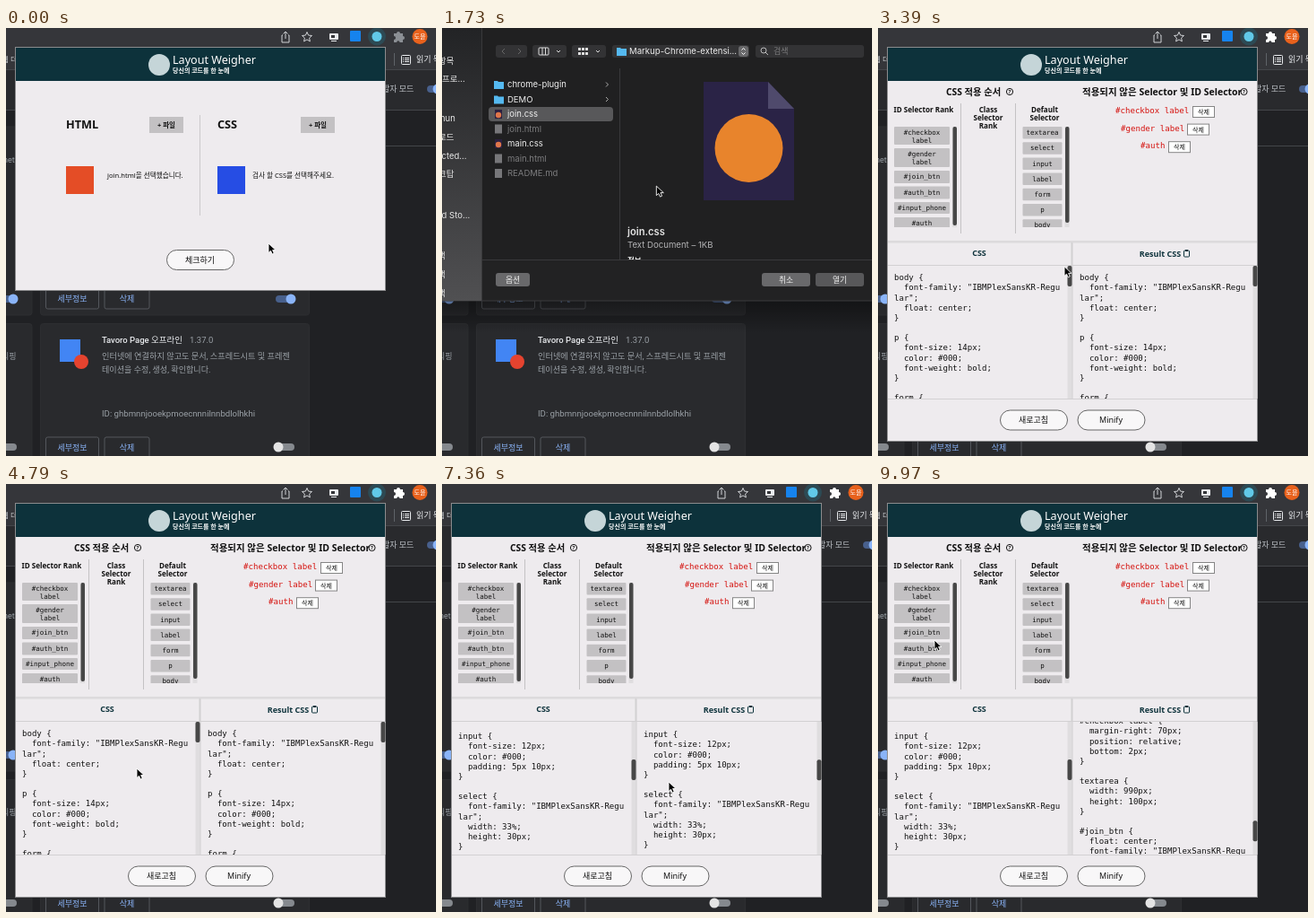
Animation of 480x477 px, one loop 10 s. Source, as an HTML page:

```html
<!DOCTYPE html>
<html lang="ko">
<head>
<meta charset="utf-8">
<style>
  html, body { margin: 0; height: 100%; overflow: hidden; background: #202124; }
  svg { display: block; width: 100vw; height: 100vh; }
  text { font-family: "Noto Sans", "Noto Sans CJK KR", "Noto Sans CJK", sans-serif; white-space: pre; }
  .ui text { font-family: Inter, "Noto Sans CJK KR", "Noto Sans CJK", sans-serif; }
  .page text { font-family: Roboto, "Noto Sans CJK KR", "Noto Sans CJK", sans-serif; }
  .mono text { font-family: "DejaVu Sans Mono", monospace; }
</style>
</head>
<body>
<svg id="stage" viewBox="0 0 480 477"></svg>
<script>
const INK = '#111', TEAL = '#0d323b', PAPER = '#eeebee', GREY = '#9aa0a6', BLUE = '#8ab4f8', CHIP = '#c3c1c3';

// Markup helpers; text is placed by its vertical centre
const rect = (x, y, w, h, fill, rx = 0, stroke = 'none') =>
  `<rect x="${x}" y="${y}" width="${w}" height="${h}" rx="${rx}" fill="${fill}" stroke="${stroke}"/>`;
const dot = (x, y, r, fill, stroke = 'none') => `<circle cx="${x}" cy="${y}" r="${r}" fill="${fill}" stroke="${stroke}"/>`;
const path = (d, stroke, fill = 'none', w = 1) => `<path d="${d}" stroke="${stroke}" fill="${fill}" stroke-width="${w}"/>`;
const text = (x, y, size, str, fill = INK, weight = 400, anchor = 'start') =>
  `<text x="${x}" y="${y + size * .36}" font-size="${size}" fill="${fill}" font-weight="${weight}" text-anchor="${anchor}">${str}</text>`;
const mid = (x, y, size, str, fill, weight) => text(x, y, size, str, fill, weight, 'middle');
const group = (id, body, cls = '') => `<g id="${id}" class="${cls}">${body}</g>`;
const fade = (id, from, to, fromAlpha = 1, toAlpha = 1) => `<linearGradient id="${id}" x2="0" y2="1">
  <stop stop-color="${from}" stop-opacity="${fromAlpha}"/><stop offset="1" stop-color="${to}" stop-opacity="${toAlpha}"/></linearGradient>`;
const clip = (id, ...box) => `<clipPath id="${id}">${rect(...box, '#000')}</clipPath>`;
const pill = (x, y, label) => rect(x, y, 75, 22, '#f8f7f8', 11, '#666') + mid(x + 37, y + 11, 9, label);

function browser() {
  const outline = (x, y, w, label) => rect(x, y, w, 23, 'none', 2, '#54575c') + mid(x + w / 2, y + 11.5, 9, label, BLUE, 500);
  const buttons = y => outline(44.5, y, 59, '세부정보') + outline(110, y, 50, '삭제');
  const card = (x, y, w, h) => rect(x, y, w, h, '#292a2d', 3, '#2d2e31');
  const toggle = (x, y, on) => rect(x, y - 4, 21, 8, on ? '#48608c' : '#85898e', 4)
    + dot(on ? x + 17 : x + 3, y, 5.5, on ? BLUE : '#e4e4e4');
  return rect(0, 0, 480, 477, '#202124') + rect(0, 0, 480, 46, '#35363a') + rect(0, 47, 480, 44, '#292a2d')
    + path('M0 46.5H480M0 91.5H480M0 131.5H480', '#44464a')
    + path('M309 8h-1v8h8v-8h-1M312 12V4M309.5 6.5L312 4l2.5 2.5', '#d0d2d5')
    + path('M336 4.5l1.6 3.6 3.9.4-2.9 2.6.8 3.8-3.4-2-3.4 2 .8-3.8-2.9-2.6 3.9-.4z', '#d0d2d5')
    + rect(361, 6, 10, 7, '#e8eaed', 1) + rect(363, 8, 4, 3, '#35363a') + rect(363, 14, 6, 1, '#e8eaed')
    + rect(384, 3, 12, 12, '#1683ee', 1) + dot(414, 9.5, 10, '#2d4a54') + dot(414, 9.5, 5.5, '#61c9e8')
    + '<path id="puzzle" d="M433 6h3a2 2 0 1 1 4 0h3v3a2 2 0 1 1 0 4v3h-3.5a1.7 1.7 0 0 0-3.4 0H433v-3a2 2 0 0 0 0-4z"/>'
    + dot(462, 9.5, 8.5, '#e8611c') + mid(462, 9.5, 7, '도윤', '#fff')
    + text(-5, 35, 8.5, '웹 더', '#c4c7cb') + path('M433.5 28V42', '#5f6368')
    + rect(441.5, 30.5, 10, 10, 'none', 1, '#e8eaed') + path('M443 33.5h1m1 0h5M443 35.5h1m1 0h5M443 37.5h1m1 0h5', '#e8eaed')
    + text(458, 35, 9, '읽기 목록', '#e8eaed')
    + text(420, 68, 9, '발자 모드', '#bdc1c6') + rect(470, 64, 20, 8, '#48608c', 4) + dot(482, 68, 5.5, BLUE)
    + card(-20, 110, 49, 210) + card(38.5, 110, 300, 210) + card(-20, 329.5, 49, 160) + card(38.5, 329.5, 300, 160)
    + text(-3, 147, 9, 'net', GREY) + text(-5, 366, 9, '리핑', GREY)
    + toggle(-9, 302, true) + toggle(301, 302, true) + buttons(290)
    + rect(-8, 463, 20, 8, '#85898e', 4) + toggle(301, 467, false) + buttons(456)
    + rect(60, 347, 23, 25, '#4285f4') + dot(84, 372, 8, '#e5432f')
    + text(107, 348, 9.5, 'Tavoro Page 오프라인', '#e8eaed', 500) + text(205, 348, 9.5, '1.37.0', GREY)
    + text(107, 366, 9.2, '인터넷에 연결하지 않고도 문서, 스프레드시트 및 프레젠', GREY)
    + text(107, 381, 9.1, '테이션을 수정, 생성, 확인합니다.', GREY)
    + text(107, 430, 9.6, 'ID: ghbmnnjooekpmoecnnnilnnbdlolhkhi', GREY);
}

const popupFrame = h => rect(10.5, 21.5, 413, h, PAPER, 0, '#8b8b8d') + rect(11, 22, 412, 37, TEAL)
  + dot(171, 41, 12, '#c5d5d8') + text(186, 35.5, 12.6, 'Layout Weigher', '#fff')
  + text(186, 47, 7, '당신의 코드를 한 눈에', '#fff', 600);

function picker() {
  const column = (x, name, colour) => text(x, 107, 12.7, name, INK, 600)
    + rect(x + 93, 99, 38, 18, CHIP) + mid(x + 112, 108, 7.5, '+ 파일', INK, 600) + rect(x, 154, 31, 31, colour);
  return popupFrame(271) + column(67, 'HTML', '#e44d26') + column(236, 'CSS', '#264de4')
    + path('M216.5 97V209', '#cbc9cb')
    + text(113, 164, 7.6, 'join.html을 선택했습니다.', INK, 500)
    + group('waiting', text(275, 164, 7.6, '검사 할 CSS를 선택해주세요.', INK, 500))
    + group('chosen', text(275, 164, 7.6, 'join.css을 선택했습니다.', INK, 500))
    + pill(179.5, 247.5, '체크하기');
}

const FAMILY = 'font-family: "IBMPlexSansKR-Regu\nlar"';
const RULES = [
  ['body', FAMILY, 'float: center'],
  ['p', 'font-size: 14px', 'color: #000', 'font-weight: bold'],
  ['form', FAMILY, 'width: 990px', 'margin: 0 auto', 'padding: 10px', 'font-size: 12px', 'color: #000'],
  ['label', 'font-size: 12px', 'color: #000'],
  ['input', 'font-size: 12px', 'color: #000', 'padding: 5px 10px'],
  ['select', FAMILY, 'width: 33%', 'height: 30px'],
  ['#input_phone', 'width: 70%', 'height: 30px', 'float: left'],
  ['#auth_btn', 'width: 25%', 'height: 30px', 'color: #fff', 'border: none', 'float: right'],
  ['#gender label', 'margin-right: 70px', 'position: relative', 'bottom: 2px'],
  ['#auth', 'width: 100%', 'height: 30px', 'float: left', 'margin: 5px 0', 'padding: 5px', 'color: #000'],
  ['#checkbox label', 'margin-right: 70px', 'position: relative', 'bottom: 2px'],
  ['textarea', 'width: 990px', 'height: 100px'],
  ['#join_btn', 'float: center', FAMILY, 'width: 200px', 'height: 40px', 'color: #fff', 'border: none', 'margin: 10px', 'font-size: 14px', 'cursor: pointer']
];
const lines = RULES.map(([name, ...props]) => `${name} {\n${props.map(p => `  ${p};\n`).join('')}}\n`).join('\n').split('\n');

function results() {
  const chip = (x, y, w, h, words) => rect(x, y, w, h, CHIP, 1)
    + words.split(' ').map((s, i, all) => mid(x + w / 2, y + 6.5 + i * 9 - (all.length > 1 ? .5 : 0), 7.5, s)).join('');
  const ids = [[110, 20, '#checkbox label'], [134, 21, '#gender label'], [159, 14, '#join_btn'],
    [176.5, 14, '#auth_btn'], [194, 13, '#input_phone'], [211, 14, '#auth']];
  const tags = ['textarea', 'select', 'input', 'label', 'form', 'p', 'body'];
  const unused = [['#checkbox label', 265, 351], ['#gender label', 271, 345], ['#auth', 293, 324]];
  const head = (x, words) => words.split('|').map((s, i) => mid(x, 91 + i * 9, 8.1, s, INK, 600)).join('');
  const help = (x, y) => dot(x, y, 3.6, 'none', INK) + mid(x, y, 6, '?', INK, 700);
  const code = (id, x) => '<g clip-path="url(#codeClip)">' + group(id, lines.map((s, i) => text(x, 278 + i * 11.17, 9.05, s)).join(''), 'mono') + '</g>';
  const bar = (id, x) => rect(x, 265, 5, 148, '#dfdddf') + group(id, rect(x, 265, 5, 23, '#474747', 2));
  return popupFrame(439)
    + text(76, 71, 10.3, 'CSS 적용 순서', INK, 600) + help(147, 71)
    + text(228, 71, 10.5, '적용되지 않은 Selector 및 ID Selector', INK, 600) + help(408.5, 71)
    + head(51, 'ID Selector Rank') + head(123, 'Class|Selector|Rank') + head(186, 'Default|Selector')
    + path('M92.5 84V229M153.5 84V229', '#c4c2c4')
    + '<g class="mono" clip-path="url(#listClip)">' + ids.map(([y, h, s]) => chip(18, y, 62, h, s)).join('')
    + tags.map((s, i) => chip(161.5, 110 + i * 17.2, 44, 13.5, s)).join('') + '</g>'
    + rect(83, 110, 5, 112, '#dfdddf') + rect(83.5, 110, 4.5, 110, '#474747', 2)
    + rect(208.5, 110, 5, 112, '#dfdddf') + rect(209, 110, 4.5, 107, '#474747', 2)
    + unused.map(([s, x, bx], i) => group('', text(x, 92 + i * 19.6, 9.1, s, '#d5120e'), 'mono')
      + rect(bx + .5, 87.5 + i * 19.6, 24, 12, '#fff', 0, '#858585') + mid(bx + 12.5, 93.5 + i * 19.6, 7, '삭제')).join('')
    + rect(11, 237, 412, 2.5, '#dcdadc') + path('M11 264.5H423M11 413.5H423', '#d2d0d2') + path('M216.5 239V413', '#d2d0d2', 'none', 2)
    + mid(113, 251, 9, 'CSS', TEAL, 600) + mid(315, 252, 9, 'Result CSS', TEAL, 600)
    + rect(341.5, 248, 6, 7, 'none', 1, TEAL) + rect(343, 247, 3, 2, TEAL)
    + code('leftCode', 18) + code('rightCode', 225) + bar('leftThumb', 211.5) + bar('rightThumb', 418.5)
    + pill(136.5, 426, '새로고침') + pill(223, 426, 'Minify');
}

function dialog() {
  const button = (x, w, label, fill = '#69696b', ink = '#eee') => rect(x, 273, w, 15, fill, 3) + mid(x + w / 2, 280.5, 8.8, label, ink);
  const folder = (x, y) => path(`M${x} ${y - 4}h4l1 1h6v8h-11z`, 'none', '#55b9f0');
  const tool = (x, w) => rect(x, 19, w, 14, '#333335', 3);
  const row = (s, i) => {
    const y = 63 + i * 16.5, dim = /html|md/.test(s);
    const icon = i < 2 ? folder(58, y) + path(`M183 ${y - 2.5}l2.5 2.5-2.5 2.5`, '#aaa')
      : rect(59, y - 5, 8, 10, dim ? '#77777a' : '#2b2040') + (dim ? '' : dot(63, y + 1, 3.2, '#e0764a'));
    return icon + text(73, y, 9.5, s, dim ? '#7c7c7e' : '#f0f0f0');
  };
  const side = [['항목', 37, -4], ['프로...', 57, 0], ['hun', 101, -2], ['로드', 122, -4], ['ected...', 143, -6],
    ['크탑', 163, -4], ['ud Sto...', 209, -6], ['색', 254, -5], ['색', 275, -5], ['색', 296, -5]];
  return rect(0, 304, 480, 36, 'url(#shadow)') + rect(-2, -30, 484, 334, '#202021', 0, '#3c3c3e')
    + rect(0, -30, 44, 334, 'url(#sidebar)')
    + side.map(([s, y, x]) => text(x, y, 9.5, s, '#e6e6e6')).join('')
    + path('M198.5 45V258', '#39393b')
    + tool(60, 35) + path('M70 23l-3 3 3 3M85 23l3 3-3 3', '#666')
    + tool(101, 38) + rect(108, 22, 11, 8, 'none', 1, '#ddd') + path('M112 22v8M115.5 22v8M128 25l2 2 2-2', '#ddd')
    + tool(145, 38) + [0, 4, 8].map(d => rect(152 + d, 22, 3, 3, '#ddd') + rect(152 + d, 27, 3, 3, '#ddd')).join('') + path('M172 25l2 2 2-2', '#ddd')
    + tool(190, 153) + folder(195, 26) + text(209, 26, 9.6, 'Markup-Chrome-extensi...', '#eee')
    + rect(331, 20, 11, 12, '#69696b', 3) + path('M334.5 24.5l2-2 2 2M334.5 27.5l2 2 2-2', '#fff')
    + tool(350, 121) + dot(359, 25, 3, 'none', '#bbb') + path('M361 27l3 3', '#bbb') + text(370, 26, 9, '검색', '#7c7c7e')
    + group('picked', rect(52, 88, 139, 16, '#58585a', 4)
      + path('M292 60H364L393 90V192H292z', 'none', '#2a2346') + path('M364 60L393 90H364z', 'none', '#4f4a6c')
      + dot(342.5, 134, 38, '#e8842c')
      + text(207, 227, 11.2, 'join.css', '#e4e4e4', 600) + text(207, 242, 9.6, 'Text Document – 1KB', '#b4b4b6')
      + text(207, 259, 8.5, '정보', '#eee', 700))
    + rect(44, 258, 436, 45, '#222223') + path('M44.5 -30V304M44 258.5H480', '#39393b')
    + ['chrome-plugin', 'DEMO', 'join.css', 'join.html', 'main.css', 'main.html', 'README.md'].map(row).join('')
    + button(60, 38, '옵션') + button(357, 54, '취소')
    + group('openOff', button(417, 54, '열기', '#2d2d2f', '#626264')) + group('openOn', button(417, 54, '열기', '#58585a'));
}

document.getElementById('stage').innerHTML =
  clip('codeClip', 11, 265, 412, 148) + clip('listClip', 11, 110, 206, 112)
  + fade('sidebar', '#1e1f21', '#505052') + fade('shadow', '#000', '#000', .4, 0)
  + group('browser', browser(), 'page') + group('picker', picker()) + group('results', results()) + group('dialog', dialog(), 'ui')
  + group('cursor', path('M0 0V10.5L2.5 8.3L4.2 12L6.2 11.1L4.6 7.5H8z', '#fff', '#000', .9));

const el = id => document.getElementById(id);
const show = (id, on) => el(id).setAttribute('display', on ? 'inline' : 'none');
const move = (id, x, y) => el(id).setAttribute('transform', `translate(${x} ${y})`);

// Eased value at time t from keys [time, value, ...]
function at(t, keys, n = 1) {
  const i = keys.findIndex(k => k[0] > t);
  if (i < 1) return keys[i < 0 ? keys.length - 1 : 0][n];
  const a = keys[i - 1], b = keys[i], u = (t - a[0]) / (b[0] - a[0]);
  return a[n] + (b[n] - a[n]) * u * u * (3 - 2 * u);
}

const POINTER = [[0, 293, 240], [90, 293, 240], [460, 348, 106], [580, 348, 106], [880, 150, 226], [1250, 85, 97],
  [1480, 85, 97], [2030, 440, 279], [2220, 440, 279], [2450, 350, 214], [2850, 220, 256], [3200, 220, 256],
  [3950, 146, 317], [4800, 146, 317], [5500, 133, 332], [6250, 133, 332], [6700, 253, 332], [9200, 253, 332], [9900, 63, 174]];
const DIALOG = [[690, 0], [1010, 1], [2330, 1], [2620, 0]];
const LEFT = [[4850, 0], [5750, 241.6], [5900, 241.6], [6200, 298.6]];
const RIGHT = [[6750, 0], [7320, 300.6], [7420, 300.6], [8800, 784.7]];

function frame(now) {
  const t = now % 10000, opacity = at(t, DIALOG), checked = t >= 3250, picked = t >= 1400;
  show('picker', !checked);
  show('results', checked);
  show('waiting', t < 2650);
  show('chosen', t >= 2650);
  show('picked', picked);
  show('openOn', picked);
  show('openOff', !picked);
  show('dialog', opacity > 0);
  el('dialog').setAttribute('opacity', opacity);
  move('dialog', 0, t < 1010 ? -19.4 * (1 - opacity) : 0);
  el('puzzle').setAttribute('fill', checked ? '#fff' : '#8b8f94');
  for (const [name, keys] of [['left', LEFT], ['right', RIGHT]]) {
    const scroll = at(t, keys);
    move(name + 'Code', 0, -scroll);
    move(name + 'Thumb', 0, scroll * .1406);
  }
  move('cursor', at(t, POINTER), at(t, POINTER, 2));
  requestAnimationFrame(frame);
}
frame(0);
</script>
</body>
</html>
```
